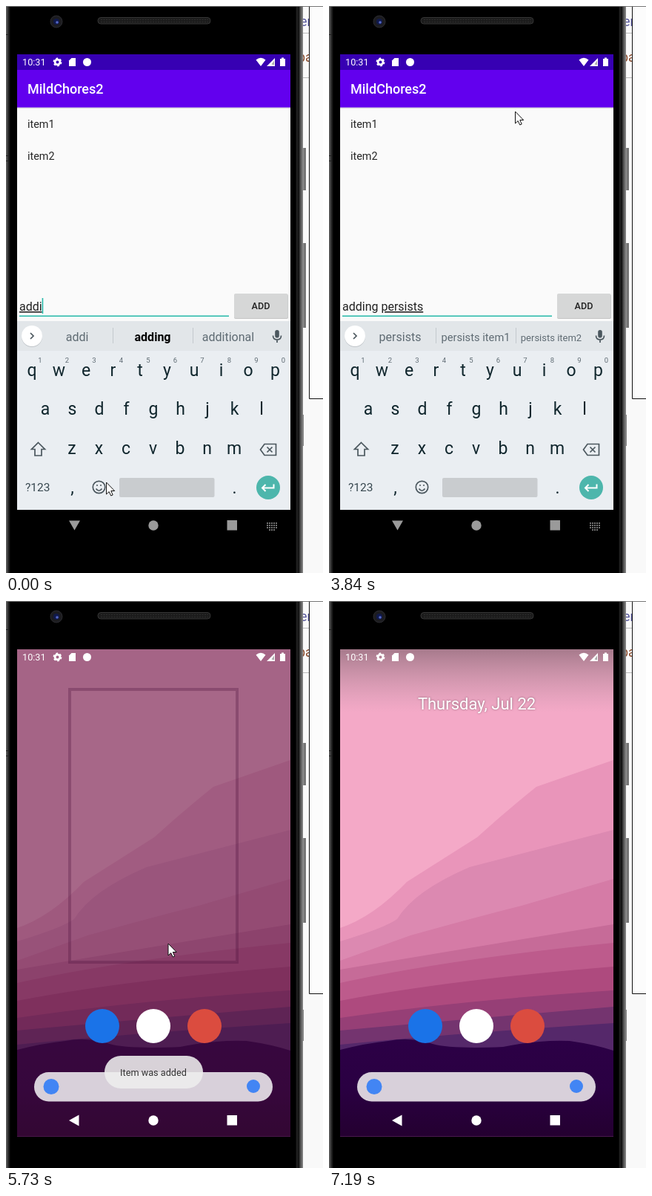
Animation of 428 by 763 pixels, one loop 8 s. Source, as an HTML page:

```html
<!DOCTYPE html>
<html lang="en">
<head>
<meta charset="utf-8">
<style>
html, body { margin: 0; width: 100%; height: 100%; overflow: hidden; background: #f9f9f9 }
body > svg { display: block; width: 428px; height: 763px }
text { font-family: Roboto, sans-serif; white-space: pre }
.mid text, text.mid { text-anchor: middle }
.line { fill: none; stroke: #4b575e; stroke-width: 1.7 }
</style>
</head>
<body>
<svg viewBox="0 0 428 763">
<defs>
  <linearGradient id="body">
    <stop offset="0" stop-color="#666"/><stop offset=".008" stop-color="#2a2a2a"/>
    <stop offset=".015"/><stop offset=".975"/>
    <stop offset=".98" stop-color="#292929"/><stop offset=".985" stop-color="#0a0a0a"/>
    <stop offset=".99" stop-color="#444"/><stop offset="1" stop-color="#8a8a8a"/>
  </linearGradient>
  <linearGradient id="shade" x2="0" y2="1">
    <stop offset="0" stop-color="#333" stop-opacity=".4"/><stop offset="1" stop-color="#777" stop-opacity="0"/>
  </linearGradient>
  <linearGradient id="hill" x2="0" y2="1">
    <stop offset="0" stop-color="#2c0046"/><stop offset=".5" stop-color="#2a0042"/><stop offset="1" stop-color="#240030"/>
  </linearGradient>
  <clipPath id="screen"><rect x="15" y="65" width="369" height="655.5"/></clipPath>
  <g id="app">
    <rect x="15" y="65" width="369" height="656" fill="#fafafa"/>
    <rect x="15" y="65" width="369" height="21" fill="#3700b3"/>
    <rect x="15" y="136" width="369" height="2" fill="#ddd"/>
    <rect x="15" y="86" width="369" height="50.5" fill="#6200ee"/>
    <text x="29" y="118" font-size="18" font-weight="500" fill="#fff">MildChores2</text>
    <g font-size="14.4" fill="#262626">
      <text x="29" y="163.5">item1</text>
      <text x="29" y="206.5">item2</text>
      <text x="29" y="249.5" id="added">adding persists</text>
    </g>
    <g id="entry">
      <text x="18" y="410" font-size="16" id="field"><tspan id="done"></tspan><tspan id="word" text-decoration="underline"></tspan></text>
      <rect id="caret" y="393" width="1.6" height="21" fill="#26b9a9"/>
      <path d="M18 417.2H301" stroke="#26b9a9" stroke-width="1.6"/>
      <rect x="308" y="388" width="73" height="33" rx="2" fill="#c4c4c4"/>
      <rect x="308" y="387" width="72.5" height="33" rx="2" fill="#d6d7d7"/>
      <text class="mid" x="344" y="408" font-size="12.6" font-weight="500" fill="#222">ADD</text>
    </g>
  </g>
</defs>

<!-- desktop behind the phone -->
<rect width="428" height="763" fill="#f9f9f9"/>
<text x="397" y="27" font-size="18" fill="#55559a">er</text>
<text x="394" y="75" font-size="18" fill="#8a4b2c">pa</text>
<path d="M400 36.5h9M400 96.5h9" stroke="#bbb"/>
<rect x="410" width="18" height="528" fill="#fcfcfc"/>
<path d="M409.5 0V528.5H428" fill="none" stroke="#111"/>
<path d="M399 191h5.5v57h-5.5zM399 319h5.5v114h-5.5zM399 550h3v42h-3z" fill="#858585"/>
<path d="M404 191v57M404 319v114" stroke="#444"/>
<rect width="401" height="763" fill="url(#body)"/>
<path d="M0 .5H428" stroke="#777"/>
<path d="M0 38.5h4M0 201.5h4M0 208.5h4" stroke="#222"/>
<rect x="124" y="15.5" width="152" height="8.5" rx="4" fill="#1b1b1b" stroke="#363636"/>
<path d="M128 18.5H273M128 21.5H273" stroke="#303030" stroke-dasharray="2 1.5"/>
<circle cx="68" cy="21" r="8" fill="#1c1c20" stroke="#2c2c30"/>
<circle cx="68" cy="21" r="4" fill="#10194a"/><circle cx="69" cy="22" r="1.8" fill="#5568c8"/>

<g clip-path="url(#screen)">
  <g id="home">
    <rect x="15" y="65" width="369" height="656" fill="#f4a9c7"/>
    <g id="bands"></g>
    <path fill="url(#hill)" d="M15 604Q50 595 80 592Q110 586 140 596Q165 603 235 600Q285 590 325 592Q360 597 384 605V721H15Z"/>
    <rect id="dim" x="15" y="65" width="369" height="656" fill="#461137"/>
    <rect id="top" x="15" y="65" width="369" height="85" fill="url(#shade)"/>
    <circle cx="130" cy="572" r="23" fill="#1a73e8"/>
    <circle cx="199" cy="572" r="23" fill="#fff"/>
    <circle cx="268" cy="572" r="23" fill="#db4c3f"/>
    <rect x="38" y="634" width="322" height="39.5" rx="19.7" fill="#d8d0da"/>
    <circle cx="61" cy="653.5" r="10.5" fill="#4285f4"/>
    <circle cx="334" cy="653" r="9" fill="#4285f4"/>
    <text id="date" class="mid" x="199.5" y="145.5" font-size="22" fill="#fff" style="text-shadow:0 0 3px #0006">Thursday, Jul 22</text>
  </g>
  <rect id="card" x="86" width="226" height="367" fill="#fff" fill-opacity=".02" stroke="#4b1038" stroke-opacity=".3" stroke-width="4"/>
  <svg id="task" viewBox="15 65 369 612" preserveAspectRatio="xMidYMin slice"><use href="#app"/></svg>
  <g id="toast">
    <rect x="133" y="612" width="133" height="44" rx="22" fill="#eee" fill-opacity=".88"/>
    <text class="mid" x="199" y="639" font-size="12.7" fill="#333">Item was added</text>
  </g>
  <g id="keyboard">
    <rect x="15" y="424" width="369" height="254" fill="#eaeef2"/>
    <rect x="15" y="424" width="369" height="40" fill="#e2e6e9"/>
    <circle cx="35" cy="445" r="14" fill="#bfc4c8"/><circle cx="35" cy="444" r="14" fill="#fff"/>
    <path id="chevron" class="line"/>
    <g id="suggest" class="mid" fill="#5f6b73">
      <text y="450.5"/><text y="450.5"/><text y="450.5"/>
      <path d="M144.5 433V454M252.5 433V454" stroke="#c3c9cd"/>
    </g>
    <g id="tools">
      <g class="line">
        <circle cx="84" cy="442" r="5"/><path d="M87.5 446l5 5"/>
        <path d="M135 437h9q2 0 2 2v8l-4 4h-7q-2 0-2-2v-10q0-2 2-2zM142 451v-4h4M136 445q3 4 6 0M137 441h1M141 441h1"/>
      </g>
      <text class="mid" x="192" y="448.5" font-size="12" font-weight="900" fill="#4b575e">GIF</text>
      <rect x="240.5" y="437" width="14" height="14" fill="#5a666c"/>
      <path d="M280.5 434V454" stroke="#cfd4d8"/>
      <path d="M307.5 444h.1M313 444h.1M318.5 444h.1" stroke="#4b575e" stroke-width="3.6" stroke-linecap="round"/>
    </g>
    <rect x="363.2" y="436" width="5.6" height="10.5" rx="2.8" fill="#4b575e"/>
    <path class="line" d="M360.5 443.5q0 5.5 5.5 5.5t5.5-5.5M366 449v4"/>
    <g id="keys" class="mid" fill="#10262d"></g>
    <path class="line" d="M43.5 587.5l9 9h-4.5v8.5h-9v-8.5h-4.5z"/>
    <path class="line" d="M349 589.5h15.5v15h-15.5l-5.5-7.5zM352.5 593.5l7 7M359.5 593.5l-7 7"/>
    <text x="26" y="653" font-size="15.5" fill="#37474f">?123</text>
    <circle class="line" cx="125.5" cy="647.5" r="8.2"/>
    <path class="line" d="M121.5 649.5q4 5.5 8 0M122 645h2M127 645h2"/>
    <rect x="153" y="635" width="128.5" height="26" rx="2" fill="#c9cccf"/>
    <circle cx="354" cy="648" r="16" fill="#4db6ac"/>
    <path d="M361.5 643.5v5h-15M350.5 644l-4.5 4.5l4.5 4.5" fill="none" stroke="#fff" stroke-width="2"/>
  </g>
  <rect id="ripple" x="257" y="678" width="96" height="43" rx="21" fill="#191919"/>
  <g id="nav">
    <path id="back"/><circle cx="199" cy="699" r="6.7"/><rect x="298.5" y="692" width="13.5" height="13.5"/>
  </g>
  <path id="switcher" d="M352 696h14M352 699h14M352 702h14M355 705h8" stroke="#999" stroke-width="1.6" stroke-dasharray="2 1"/>
  <g fill="#fff">
    <text x="22" y="80.3" font-size="12.7">10:31</text>
    <circle cx="69.5" cy="75.5" r="3.4" fill="none" stroke="#fff" stroke-width="2.8"/>
    <circle cx="69.5" cy="75.5" r="5.2" fill="none" stroke="#fff" stroke-width="1.5" stroke-dasharray="2.7 2.745"/>
    <path d="M88.5 70h5.5v11h-9v-7.5z"/>
    <circle cx="109.5" cy="75.5" r="5.5"/>
    <path d="M337.5 72.5q6.5-5.5 13 0l-6.5 8.5zM363 70v11h-11zM370 71h2v-1.5h3v1.5h2v10h-7z"/>
    <path d="M358.5 78.5l3.5-5v6z" fill="#0005"/>
  </g>
</g>
<path id="mouse" d="M0 0V16L3.7 12.6L6.2 18L8.7 17L6.3 11.5H11.2Z" fill="#fff" stroke="#111"/>
</svg>

<script>
const LOOP = 8000, ADDED = 3960, SHRINK = 5610, CARD = 5730, THUMB = 5870, BRIGHT = 6740;
const $ = id => document.getElementById(id);
const show = (id, on) => $(id).setAttribute('display', on ? 'inline' : 'none');
const set = (el, attrs) => { for (const k in attrs) el.setAttribute(k, attrs[k]); };
const at = (steps, t) => steps.findLast(s => s[0] <= t);

// time, finished text, word being typed, suggestions
const typing = [
  [0, '', 'addi', 'addi', 'adding', 'additional'],
  [120, '', 'addin', 'addin', 'adding', 'addition'],
  [270, '', 'adding', 'adding', 'addings', 'adding to'],
  [420, 'adding ', '', 'the', 'a', 'more'],
  [1020, 'adding ', 'p', 'p', 'people', 'project'],
  [1150, 'adding ', 'pe', 'pe', 'people', 'per'],
  [1290, 'adding ', 'per', 'per', 'person', 'personal'],
  [1420, 'adding ', 'pers', 'pers', 'person', 'personal'],
  [1550, 'adding ', 'persi', 'persi', 'persist', 'persists'],
  [1680, 'adding ', 'persis', 'persis', 'persist', 'persistent'],
  [2000, 'adding ', 'persist', 'persist', 'persistent', 'persists'],
  [2150, 'adding ', 'persists', 'persists', 'persists item1', 'persists item2'],
];
// time, x, y: the pointer holds each place until the next
const pointer = [
  [0, 135.5, 641], [2700, 240, 520], [2900, 382, 400], [3110, 368, 398], [3570, 345, 360],
  [3700, 300, 250], [3840, 251.5, 142], [3960, 225, 82], [4090, 205, 200], [4230, 240, 420],
  [4360, 285, 620], [4500, 303, 699], [4620, 304, 712], [4760, 303, 726], [4900, 303, 715],
  [5040, 304, 702], [5310, 295, 680], [5450, 267, 595], [5610, 242, 530], [5730, 219, 461],
  [5870, 219, 440], [6010, 221, 330], [6150, 224, 150], [6300, 226, 45], [6440, 228, 64],
  [6590, 230, 330], [6740, 233, 655], [6890, 270, 700], [7040, 316, 742], [7190, 330, 780],
];
const bands = [
  ['#e995ba', 'M15 440Q60 425 105 378L200 318Q240 282 280 250L384 214'],
  ['#dc89b1', 'M15 458Q75 440 92 428Q115 390 190 358L384 308'],
  ['#d57ba6', 'M15 484L110 450Q200 425 260 410L384 374'],
  ['#c66b98', 'M15 496Q140 475 384 435'],
  ['#bd5b8c', 'M15 514Q160 482 384 460'],
  ['#ae4a7e', 'M15 538Q160 510 384 492'],
  ['#963f76', 'M15 561Q170 538 384 524'],
  ['#74346f', 'M15 578Q170 564 384 546'],
  ['#55286a', 'M15 597Q170 582 384 568'],
];
$('bands').innerHTML = bands.map(([c, d]) => `<path fill="${c}" d="${d}V721H15Z"/>`).join('');

const row = (letters, x, y) => [...letters].map((c, i) =>
  `<text x="${x + 36.5 * i}" y="${y}" font-size="23">${c}</text>`).join('');
$('keys').innerHTML = row('qwertyuiop', 35, 498) + row('asdfghjkl', 53, 550) + row('zxcvbnm', 89, 603)
  + row(',', 89.5, 656) + row('.', 308.5, 656)
  + [...'1234567890'].map((n, i) => `<text x="${46 + 36.5 * i}" y="480" font-size="9.5" fill="#5f6b73">${n}</text>`).join('');

const pen = document.createElement('canvas').getContext('2d');
pen.font = '16px Roboto, sans-serif';

function drawEntry(t) {
  const [, done, word, ...options] = at(typing, t);
  const empty = t >= ADDED;
  $('done').textContent = empty ? 'Add an item here!' : done;
  $('word').textContent = empty ? '' : word;
  set($('field'), { fill: empty ? '#999' : '#222' });
  set($('caret'), { x: 18 + (empty ? 0 : pen.measureText(done + word).width) });
  show('caret', empty ? t < SHRINK && (t < 4500 || t >= 5040) : t < 2700);
  show('added', empty);
  show('suggest', !empty);
  show('tools', empty);
  set($('chevron'), { d: empty ? 'M37.5 440l-4 4l4 4' : 'M33 440l4 4l-4 4' });
  $('suggest').querySelectorAll('text').forEach((el, i) => {
    const strong = i === 1 && t < 270;
    el.textContent = options[i];
    set(el, {
      x: 96 + 102 * i, fill: strong ? '#000' : '#5f6b73', 'font-weight': strong ? 700 : 400,
      'font-size': options[i].length > 11 ? [16, 14.7, 13][i] : 16,
    });
  });
}

function drawTask(t, mouseY) {
  const inApp = t < SHRINK;
  const cardY = 119 + (t < THUMB ? 0 : Math.min(0, mouseY - 440));
  const [x, y, width, height] = inApp ? [15, 65, 369, 612] : t < CARD ? [80, 110, 238, 405] : [86, cardY, 226, 367];
  set($('task'), { x, y, width, height });
  show('task', t < CARD || t >= THUMB && t < 6440);
  set($('card'), { y: cardY });
  show('card', t >= CARD && t < 6440);
  set($('entry'), { transform: `translate(0 ${inApp ? 0 : 240})` });
  show('home', !inApp);
  show('keyboard', inApp);
  show('switcher', inApp);
  show('toast', !inApp && t < 6010);
  show('ripple', inApp && t >= 5310);
  set($('nav'), { fill: t < 5180 ? '#9a9a9a' : '#fff' });
  set($('back'), { d: inApp ? 'M85 692.5h15l-7.5 13z' : 'M98.5 691.5v15l-13.5-7.5z' });
  const light = t < 6590 ? 0 : t < BRIGHT ? .5 : 1;
  set($('dim'), { opacity: .45 * (1 - light) });
  set($('top'), { opacity: light });
  set($('date'), { opacity: light });
}

function draw(now) {
  const t = now % LOOP;
  const [, x, y] = at(pointer, t);
  set($('mouse'), { transform: `translate(${x} ${y})` });
  drawEntry(t);
  drawTask(t, y);
  requestAnimationFrame(draw);
}
requestAnimationFrame(draw);
</script>
</body>
</html>
```
